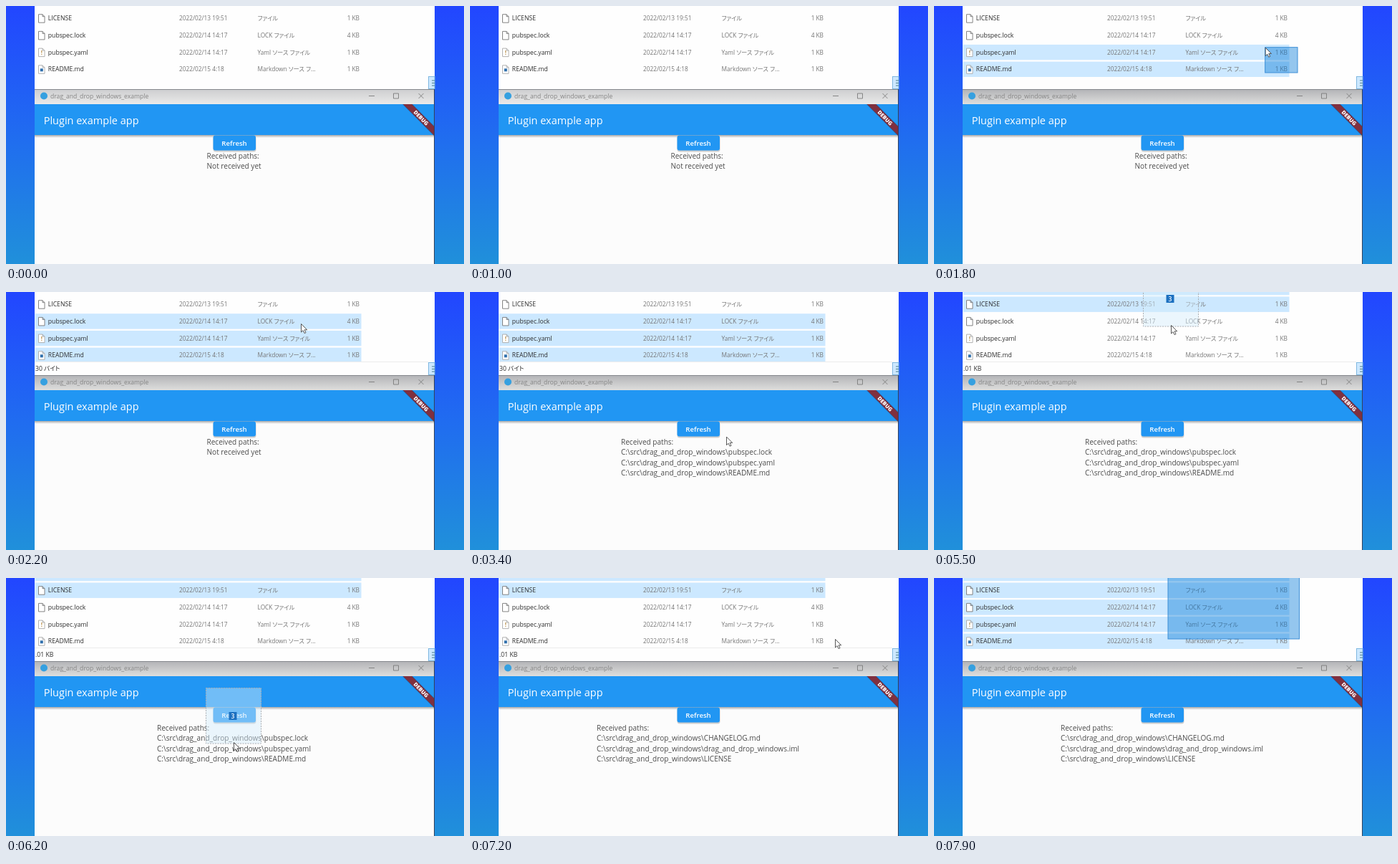
An HTML page for the animation above (8000 ms loop, 640x360 px).

```html
<!DOCTYPE html>
<html lang="ja">
<head>
<meta charset="utf-8">
<title>Drag and drop</title>
<style>
  html, body { margin: 0; width: 100%; height: 100%; overflow: hidden; }
  svg { display: block; width: 640px; height: 360px; }
  text {
    font-family: "Open Sans", "Noto Sans", "Noto Sans CJK JP", sans-serif;
    font-size: 8.3px; font-feature-settings: "palt"; white-space: pre;
  }
  .name { font-size: 8.65px; fill: #2c2c2c; }
  .meta { fill: #757575; }
  .body { font-size: 10.07px; fill: #4c4c4c; }
</style>
</head>
<body>
<svg id="stage" viewBox="0 0 640 360" xmlns="http://www.w3.org/2000/svg">
  <defs>
    <linearGradient id="desk" x2="0" y2="1">
      <stop offset="0" stop-color="#2246ff"/>
      <stop offset=".5" stop-color="#206cf0"/>
      <stop offset="1" stop-color="#2090da"/>
    </linearGradient>
    <linearGradient id="chrome" x2="0" y2="1">
      <stop offset="0" stop-color="#b2b3b6"/>
      <stop offset="1" stop-color="#dededd"/>
    </linearGradient>
    <linearGradient id="shade" x2="0" y2="1">
      <stop offset="0" stop-color="#555" stop-opacity=".5"/>
      <stop offset="1" stop-color="#555" stop-opacity="0"/>
    </linearGradient>
    <clipPath id="bar"><rect x="40" y="137" width="558" height="46"/></clipPath>
  </defs>
  <rect width="640" height="360" fill="url(#desk)"/>

  <rect x="40" width="559" height="116" fill="#fefefe"/>
  <g id="rows"></g>
  <g id="status">
    <rect x="40" y="98" width="559" height="18" fill="#fefefe"/>
    <path d="M40 97.5H590" stroke="#ececec"/>
    <text id="size" class="name" x="41" y="110"></text>
  </g>
  <rect x="590.5" y="98.5" width="8.5" height="17" fill="#cce8ff" stroke="#7fb8e0"/>
  <path d="M595 104h4M595 107.5h4M595 111h4" stroke="#4d7f8c"/>

  <rect x="40" y="137" width="558" height="223" fill="#fcfcfc"/>
  <rect x="40" y="116" width="559" height="21" fill="url(#chrome)"/>
  <rect id="glow" x="40" y="116" width="559" height="21" fill="#fff" opacity=".35"/>
  <path d="M40 116.5H599" stroke="#85888c"/>
  <circle cx="53" cy="125.5" r="5" fill="#35a0e0"/>
  <text x="62" y="128.7" style="font-size:8.6px" fill="#858585">drag_and_drop_windows_example</text>
  <path d="M507 125.5h8M541.5 122h7v7h-7zM576.5 122l7 7M583.5 122l-7 7" fill="none" stroke="#7c7c7c" stroke-width=".9"/>
  <rect x="40" y="180" width="558" height="4" fill="url(#shade)"/>
  <rect x="40" y="137" width="558" height="43" fill="#2196f3"/>
  <text x="52.7" y="165.4" style="font-size:14.5px" fill="#fff">Plugin example app</text>
  <g clip-path="url(#bar)">
    <g transform="translate(598 138) rotate(45)">
      <rect x="-34" y="21" width="68" height="9" fill="#80303f" stroke="#203a60" stroke-opacity=".35"/>
      <text y="28.2" text-anchor="middle" style="font-size:7.5px;font-weight:800" fill="#fff">DEBUG</text>
    </g>
  </g>
  <rect x="289.5" y="182" width="60" height="21.5" rx="3.5" fill="#777" opacity=".35"/>
  <rect x="289.5" y="180.5" width="59.5" height="21" rx="3" fill="#2196f3"/>
  <text x="319" y="195" text-anchor="middle" style="font-size:9.6px;font-weight:600" fill="#fff">Refresh</text>
  <g id="paths"></g>
  <path d="M598.5 116V360" stroke="#33425c"/>

  <rect id="band" fill="#0078d7" fill-opacity=".42" stroke="#3f8fd6"/>
  <g id="ghost">
    <rect x="-38.5" y="-75.5" width="77" height="77.5" fill="#d3ebfa" fill-opacity=".45" stroke="#a9adb2" stroke-dasharray="2 1.5"/>
    <rect x="-6.5" y="-42" width="11" height="11" fill="#1c70c0"/>
    <text x="-1" y="-33.4" text-anchor="middle" style="font-size:8.5px;font-weight:600" fill="#fff">3</text>
  </g>
  <path id="cursor" d="M.5 .5V12l2.6-2.4 2 4 1.9-.9-1.9-3.9h3.6z" fill="#fff" stroke="#444" stroke-width=".9"/>
</svg>
<script>
const LOOP = 8000, STEP = 100;
const $ = id => document.getElementById(id);

function add(parent, tag, attrs, text) {
  const el = document.createElementNS("http://www.w3.org/2000/svg", tag);
  for (const k in attrs) el.setAttribute(k, attrs[k]);
  if (text) el.textContent = text;
  parent.append(el);
  return el;
}
const set = (el, attrs) => { for (const k in attrs) el.setAttribute(k, attrs[k]); };
const show = (el, on) => el.setAttribute("visibility", on ? "visible" : "hidden");

// the first row is mostly above the stage
const files = [
  ["drag_and_drop_windows.iml", "2022/02/13 19:51", "IML ファイル", "1 KB"],
  ["LICENSE", "2022/02/13 19:51", "ファイル", "1 KB"],
  ["pubspec.lock", "2022/02/14 14:17", "LOCK ファイル", "4 KB"],
  ["pubspec.yaml", "2022/02/14 14:17", "Yaml ソース ファイル", "1 KB"],
  ["README.md", "2022/02/15 4:18", "Markdown ソース フ...", "1 KB"]
];
const rows = files.map(([name, date, kind, size], i) => {
  const mid = 17.2 + (i - 1) * 23.7, g = $("rows");
  const top = mid - 10.7, bottom = mid + 10.7;
  const back = add(g, "rect", { x: 40.5, y: top, width: 456, height: bottom - top });
  add(g, "path", {
    d: `M45.5 ${mid - 5.5}h5.5l3 3v8.5h-8.5zM51 ${mid - 5.5}v3h3`,
    fill: "#fff", stroke: i < 3 ? "#777" : "#aaa", "stroke-width": .9
  });
  if (i === 3) add(g, "path", { d: `M49.8 ${mid - 2.5}v3.5M49.8 ${mid + 2.2}v1.3`, stroke: "#c09a5c", "stroke-width": 1.3 });
  if (i === 4) add(g, "rect", { x: 47.8, y: mid - 1, width: 4, height: 4, fill: "#2f6fac" });
  const y = mid + 3.1;
  add(g, "text", { x: 58.8, y, class: "name" }, name);
  add(g, "text", { x: 242, y, class: "meta" }, date);
  add(g, "text", { x: 351.5, y, class: "meta" }, kind);
  add(g, "text", { x: 494, y, class: "meta", "text-anchor": "end" }, size);
  return { back, top, bottom };
});

const root = "C:\\src\\drag_and_drop_windows\\";
const received = [
  [0, 280.5, ["Not received yet"]],
  [3100, 211, ["pubspec.lock", "pubspec.yaml", "README.md"].map(f => root + f)],
  [6300, 177, ["CHANGELOG.md", "drag_and_drop_windows.iml", "LICENSE"].map(f => root + f)]
];
const blocks = received.map(([from, x, lines]) => {
  const g = add($("paths"), "g", {});
  ["Received paths:", ...lines].forEach((s, i) =>
    add(g, "text", { x, y: 212.7 + i * 14.5, class: "body" }, s));
  return g;
});

// time, x, y of the pointer tip
const moves = [
  [1100, 606, 150], [1300, 530, 104], [1500, 508, 93], [1600, 508, 93],
  [1900, 440, 40], [2100, 416, 42], [2200, 412, 44], [2300, 407, 58],
  [2500, 368, 130], [2800, 328, 215], [3000, 320, 238], [3300, 330, 232],
  [3800, 470, 80], [4100, 509, 18], [4200, 509, 18], [4400, 464, 6],
  [4600, 390, -25], [5200, 350, -40], [5300, 343, -16], [5500, 331, 46],
  [5800, 322, 150], [6100, 318, 222], [6300, 318, 236], [6500, 334, 226],
  [6800, 420, 168], [7100, 502, 95], [7200, 510, 85], [7400, 510, 85],
  [7600, 466, 48], [7800, 371, -8], [7900, 327, -28]
];
// start, end, anchor x, anchor y
const bands = [[1700, 1900, 508, 93], [4300, 4900, 509, 18], [7500, 7900, 510.5, 85]];
const drags = [[2300, 2900], [5300, 6200]];
// start, end, selected rows, label
const picks = [[2000, 4100, [2, 3, 4], "30 バイト"], [5000, 7300, [0, 1], ".01 KB"]];
const during = (list, t) => list.find(([a, b]) => t >= a && t <= b);

function pointer(t) {
  const i = moves.findIndex(m => m[0] >= t);
  if (i < 1) return moves[0].slice(1);
  const [a, x, y] = moves[i - 1], [b, u, v] = moves[i];
  const k = (t - a) / (b - a);
  return [x + (u - x) * k, y + (v - y) * k];
}

function draw(t) {
  const [x, y] = pointer(t);
  const band = during(bands, t), pick = during(picks, t);

  show($("cursor"), t >= 1100);
  set($("cursor"), { transform: `translate(${x} ${y})` });
  show($("ghost"), during(drags, t));
  set($("ghost"), { transform: `translate(${x} ${y})` });

  show($("band"), band);
  if (band) {
    const [, , ax, ay] = band;
    set($("band"), { x: Math.min(x, ax), y: Math.min(y, ay), width: Math.abs(ax - x), height: Math.abs(ay - y) });
  }

  rows.forEach(({ back, top, bottom }, i) => {
    const swept = band && x < 497 && Math.min(y, band[3]) < bottom && Math.max(y, band[3]) > top;
    const on = swept || (pick && pick[2].includes(i));
    const focus = i === 2 && t > 4100 && t < 5000;
    set(back, { fill: on ? "#cce8ff" : "none", stroke: focus ? "#b4d0ee" : "none" });
  });

  show($("status"), pick);
  $("size").textContent = pick ? pick[3] : "";
  show($("glow"), t < 1700);

  const last = received.filter(r => t >= r[0]).length - 1;
  blocks.forEach((g, i) => show(g, i === last));
}

function tick() {
  draw(Math.floor(performance.now() % LOOP / STEP) * STEP);
  requestAnimationFrame(tick);
}
tick();
</script>
</body>
</html>
```
